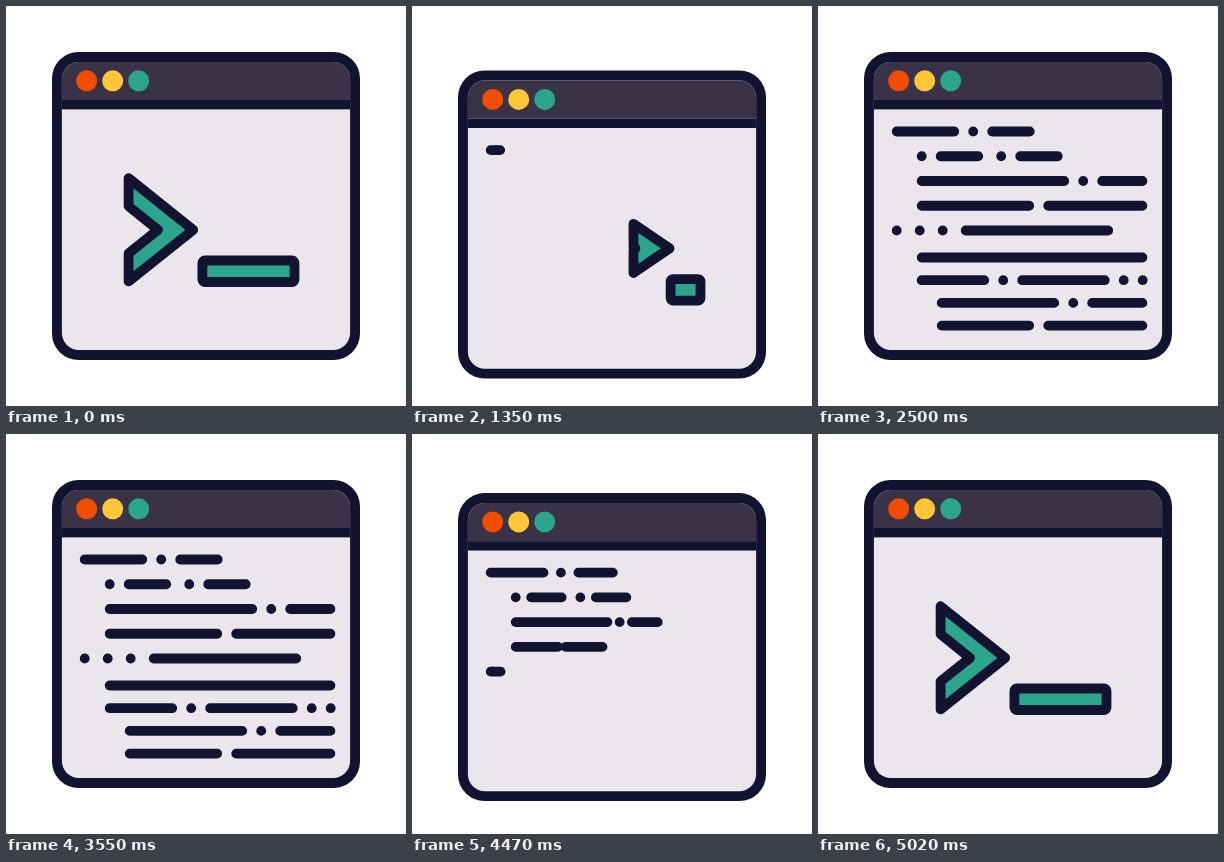
These frames come from a looping animation (400 px wide and 400 px high, 5050 ms). An HTML page with a canvas:

```html
<!DOCTYPE html>
<html lang="en">
<head>
<meta charset="utf-8">
<title>Terminal</title>
<style>
  html, body { margin: 0; width: 100%; height: 100%; overflow: hidden; background: #fff; }
  canvas { display: block; width: 100%; height: 100%; }
</style>
</head>
<body>
<canvas id="stage" width="400" height="400"></canvas>
<script>
const ctx = document.getElementById('stage').getContext('2d');
const LOOP = 5050, HALF = 3000;
const INK = '#121331', BAR = '#3a3347', PAPER = '#ebe6ec', GREEN = '#2ca58d';
const BUTTONS = ['#f24c00', '#ffc738', GREEN];
const LEFT = 78.7, RIGHT = 324.4, UNIT = 5;

// Sketch of the code: dashes are strokes, dots are dots, > runs to the right margin.
const SKETCH = [
  '------------ . --------',
  '     . --------  . --------',
  '     ----------------------------- . >',
  '     ---------------------- >',
  '.  .  .  -----------------------------',
  '     >',
  '     ------------- . ----------------- . .',
  '         ----------------------- . >',
  '         ------------------ >'
];

function layOut(text, i) {
  const origin = LEFT + UNIT * text.search(/\S/);
  const y = i < 5 ? 125.5 + 24.75 * i : 251.5 + 22.7 * (i - 5);
  const strokes = [];
  let x = origin;
  for (const [, token, gap] of text.trim().matchAll(/(\S+)( *)/g)) {
    const end = token === '>' ? RIGHT : token === '.' ? x : x + UNIT * (token.length - 0.5);
    strokes.push([x, end]);
    x = end + 15 + 4 * gap.length;
  }
  return { origin, y, strokes };
}
const rows = SKETCH.map(layOut);

const progress = (t, start, length) => Math.min(1, Math.max(0, (t - start) / length));
const smooth = p => p * p * (3 - 2 * p);
const sine = p => (1 - Math.cos(Math.PI * p)) / 2;
const cubicIn = p => p ** 3;
const mix = (a, b, p) => a + (b - a) * p;

function dropOffset(t) {
  const down = t < HALF ? progress(t, 1000, 367) : progress(t, 4115, 558);
  const up = t < HALF ? progress(t, 1367, 566) : progress(t, 4673, 352);
  return 18.7 * (smooth(down) - smooth(up));
}

function rowScale(t, i) {
  return t < HALF
    ? sine(progress(t, 1286 + 53 * i, 378))
    : 1 - cubicIn(progress(t, 4307 - 52 * i, 378));
}

function promptCollapse(t) {
  return t < HALF ? cubicIn(progress(t, 1000, 400)) : 1 - sine(progress(t, 4630, 385));
}

function fillRounded(x, y, size, radius, color) {
  ctx.beginPath();
  ctx.roundRect(x, y, size, size, radius);
  ctx.fillStyle = color;
  ctx.fill();
}

function drawWindow() {
  fillRounded(46, 46, 308, 26.5, INK);
  fillRounded(55.9, 55.9, 288.2, 17, PAPER);
  ctx.save();
  ctx.clip();
  ctx.fillStyle = BAR;
  ctx.fillRect(50, 50, 300, 44);
  ctx.fillStyle = INK;
  ctx.fillRect(50, 94, 300, 9.4);
  ctx.restore();
  BUTTONS.forEach((color, i) => fillRounded(70.2 + 26 * i, 64.3, 21, 10.5, color));
}

function drawRow({ origin, y, strokes }, scale) {
  if (scale < 0.01) return;
  const place = x => mix(origin, x, scale);
  ctx.beginPath();
  for (const [start, end] of strokes) {
    ctx.moveTo(place(start), y);
    ctx.lineTo(place(end) + 0.01, y);
  }
  ctx.stroke();
}

// Every corner slides to the cursor's right end, each at its own pace.
function drawPrompt(p) {
  if (p >= 1) return;
  const right = 288.5, mid = 223.8;
  const left = mix(122.6, right, p ** 1.32);
  const tip = mix(187.2, right, p ** 0.93);
  const notch = Math.max(left, mix(152, right, p ** 1.65));
  const half = 51.6 * (1 - p ** 1.65);
  const gap = 0.8 * (notch - left);
  const cursor = mix(196.4, right, p);
  ctx.fillStyle = GREEN;

  ctx.beginPath();
  ctx.moveTo(left, mid - half);
  ctx.lineTo(tip, mid);
  ctx.lineTo(left, mid + half);
  ctx.lineTo(left, mid + gap);
  ctx.lineTo(notch, mid);
  ctx.lineTo(left, mid - gap);
  ctx.closePath();
  ctx.fill();
  ctx.stroke();

  ctx.beginPath();
  ctx.roundRect(cursor, 254.5, right - cursor, 21.5, 2.5);
  ctx.fill();
  ctx.stroke();
}

function draw(t) {
  ctx.fillStyle = '#fff';
  ctx.fillRect(0, 0, 400, 400);
  ctx.save();
  ctx.translate(0, dropOffset(t));
  ctx.strokeStyle = INK;
  ctx.lineWidth = 9.8;
  ctx.lineCap = ctx.lineJoin = 'round';
  drawWindow();
  drawPrompt(promptCollapse(t));
  rows.forEach((row, i) => drawRow(row, rowScale(t, i)));
  ctx.restore();
}

const begin = performance.now();
function tick() {
  draw((performance.now() - begin) % LOOP);
  requestAnimationFrame(tick);
}
tick();
</script>
</body>
</html>
```
